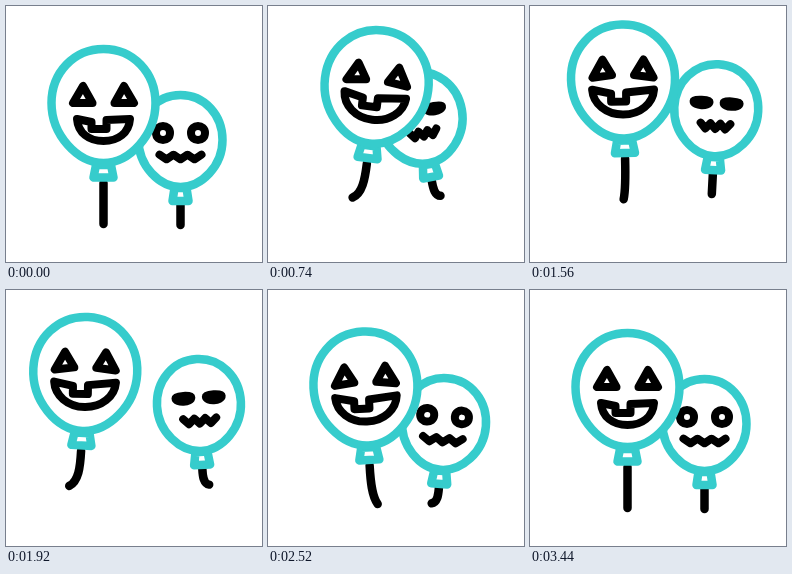
An HTML page that plays this animation: 256x256 px, repeating every 3.6 s.

```html
<!DOCTYPE html>
<html lang="en">
<head>
<meta charset="utf-8">
<title>Spooky balloons</title>
<style>
html, body { margin: 0; width: 100%; height: 100%; overflow: hidden; background: #fff; }
svg { display: block; width: 100vw; height: 100vh; }
path { stroke-linecap: round; stroke-linejoin: round; stroke-width: 8.5; fill: none; stroke: #000; }
.skin { stroke: #36cccc; fill: #fff; }
.face path { stroke-width: 8; }
</style>
</head>
<body>
<svg viewBox="0 0 256 256" id="stage"></svg>
<script>
const LOOP = 3600, STEP = 20;
const stage = document.getElementById('stage');

function add(parent, tag, attrs = {}) {
  const el = document.createElementNS('http://www.w3.org/2000/svg', tag);
  for (const k in attrs) el.setAttribute(k, attrs[k]);
  return parent.appendChild(el);
}

// Smooth curve through [time, value] pairs, flat at turning points and ends.
function curve(...keys) {
  keys = [[120, 0], ...keys, [3440, 0]];
  const slope = i => (keys[i + 1][1] - keys[i][1]) / (keys[i + 1][0] - keys[i][0]);
  const tan = keys.map((k, i) => {
    if (!i || i === keys.length - 1) return 0;
    const a = slope(i - 1), b = slope(i);
    return a * b > 0 ? 2 * a * b / (a + b) : 0;
  });
  return t => {
    if (t <= 120 || t >= 3440) return 0;
    let i = 0;
    while (t >= keys[i + 1][0]) i++;
    const [t0, a] = keys[i], [t1, b] = keys[i + 1];
    const d = t1 - t0, u = (t - t0) / d, v = 1 - u;
    return a * v * v * (1 + 2 * u) + b * u * u * (1 + 2 * v)
      + d * u * v * (tan[i] * v - tan[i + 1] * u);
  };
}

// Curve sampled at the five main poses.
const sway = (...v) => curve(...[740, 1200, 1920, 2520, 3000].map((t, i) => [t, v[i]]));

const mix = (a, b, k) => a + (b - a) * k;

function makeBalloon(o) {
  const root = add(stage, 'g');
  const body = add(root, 'g');
  const string = add(body, 'path');
  const skin = d => add(body, 'path', { class: 'skin', d });
  skin(o.knot);
  skin(o.shell);
  const face = add(root, 'g', { class: 'face' });
  const parts = [0, 1, 2].map(() => add(face, 'path'));
  return t => {
    root.setAttribute('transform', `translate(${o.x + o.dx(t)} ${o.y + o.dy(t)})`);
    body.setAttribute('transform', `rotate(${o.tilt(t)})`);
    face.setAttribute('transform', `rotate(${o.faceTilt(t)})`);
    const b = o.bend(t), top = o.stringTop, len = o.stringLen;
    string.setAttribute('d', `M0 ${top}C0 ${top + len * .4} ${b * .1} ${top + len * .75} ${b} ${top + len - 2.2 * b * b / len}`);
    o.draw(t).forEach((d, i) => parts[i].setAttribute('d', d));
  };
}

const happy = curve([640, 1], [2520, .95], [3000, .12]);
const sleepy = curve([640, 1], [1200, 1], [1920, .92], [2520, .04]);
const pinch = curve([640, 1], [1200, .95], [1920, .6], [2520, .15]);

function pumpkinFace(t) {
  const k = happy(t), lift = 3.5 * k;
  const eye = s => `M${s * 20.5} ${-18 - 2 * k}L${s * 30.5} ${-1 - k}L${s * 11} ${-1 - lift}Z`;
  const w = mix(26.5, 31, k), c = mix(15, 10, k), low = mix(37, 35, k);
  const mouth = `M${-w} ${c}L-12 ${mix(18, 14, k)}V${mix(25, 22, k)}H3V${mix(16, 13, k)}L${w} ${c}`
    + `C${w - 1} ${c + 14} ${w * .55} ${low} 0 ${low}S${1 - w} ${c + 14} ${-w} ${c}Z`;
  return [eye(-1), eye(1), mouth];
}

function ghostFace(t) {
  const k = sleepy(t), p = pinch(t);
  const r = mix(7, 8, k), up = mix(9.3, 2, k), down = mix(9.3, 5, k);
  const eye = s => {
    const x = s * mix(17.5, 15, k), y = -7;
    return `M${x - r} ${y}C${x - r} ${y - up} ${x + r} ${y - up} ${x + r} ${y}`
      + `C${x + r} ${y + down} ${x - r} ${y + down} ${x - r} ${y}Z`;
  };
  const w = mix(21, 13.5, p), amp = mix(2.3, 2.9, p);
  let mouth = '';
  for (let i = 0; i < 7; i++)
    mouth += (i ? 'L' : 'M') + (i / 3 - 1) * w + ' ' + (17 + (i % 2 ? amp : -amp));
  return [eye(-1), eye(1), mouth];
}

const ghostTilt = sway(-10, 9, -3, 4.5, -2);

const balloons = [
  makeBalloon({
    x: 174.5, y: 134,
    shell: 'M0 -45C24 -45 42 -25 42 0C42 26 21 47 0 47S-42 26 -42 0C-42 -25 -24 -45 0 -45Z',
    knot: 'M-6 48L-8 61H8L6 48Z',
    stringTop: 65, stringLen: 20,
    dx: curve([640, -19], [740, -22], [1200, -3], [1720, 16], [1950, 18.5], [2270, 12], [2520, 1.5]),
    dy: curve([640, -19], [740, -23], [1200, -35], [1740, -27], [1920, -20], [2270, -7], [2520, -1]),
    tilt: ghostTilt, faceTilt: ghostTilt,
    bend: sway(6, -6, 6, -6, 5),
    draw: ghostFace
  }),
  makeBalloon({
    x: 97.5, y: 98,
    shell: 'M0 -55C30 -55 52 -31 52 -1C52 31 26 59 0 59S-52 31 -52 -1C-52 -31 -30 -55 0 -55Z',
    knot: 'M-7.5 61L-10 73.5H10L7.5 61Z',
    stringTop: 79, stringLen: 41,
    dx: curve([740, 11], [900, 12.5], [1200, 9], [1720, -11], [1980, -19], [2270, -13], [2520, 0], [3000, -2]),
    dy: curve([640, -16], [740, -19], [1200, -27], [1740, -22], [1920, -16], [2270, -6], [2520, -1.5]),
    tilt: sway(7, -6, 3, -3, 2),
    faceTilt: sway(7, -1.5, 1, -2.5, 0),
    bend: sway(-10, 5, -10, 6, -4),
    draw: pumpkinFace
  })
];

function frame(now) {
  const t = Math.floor(now % LOOP / STEP) * STEP;
  balloons.forEach(draw => draw(t));
  requestAnimationFrame(frame);
}
frame(performance.now());
</script>
</body>
</html>
```
